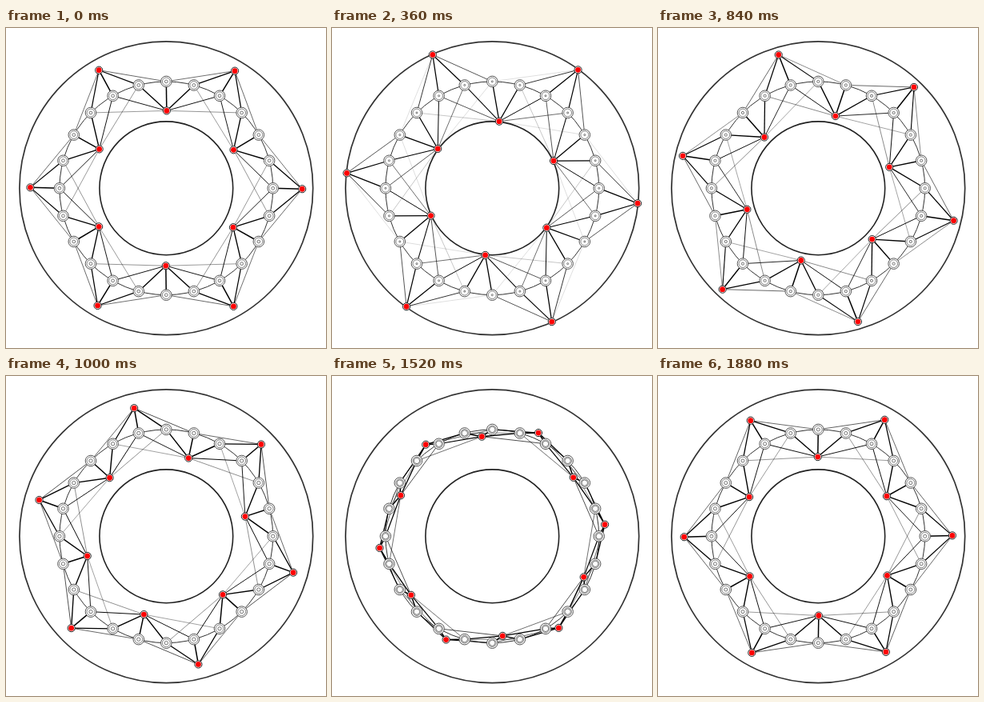
An HTML page with a canvas that plays this animation: 400 px wide and 400 px high, repeating every 1.92 s.

```html
<!DOCTYPE html>
<html lang="en">
<head>
<meta charset="utf-8">
<title>Orbiting web</title>
<style>
html, body { margin: 0; width: 100%; height: 100%; overflow: hidden; background: #fff; }
canvas { display: block; width: 400px; height: 400px; }
</style>
</head>
<body>
<canvas id="stage" width="400" height="400"></canvas>
<script>
const ctx = document.getElementById('stage').getContext('2d');
const LOOP = 1920, STEPS = 48, TAU = Math.PI * 2;
const CENTER = 200.3, RADIUS = 133.4, SWING = 50, REACH = 115;

const polar = (r, a) => ({ x: CENTER + r * Math.cos(a), y: CENTER + r * Math.sin(a) });
const ring = (count, place) => Array.from({ length: count }, (_, k) => place(k));

const nodes = ring(24, k => polar(RADIUS, k * TAU / 24));

function circle(p, r, stroke, width, fill) {
  ctx.beginPath();
  ctx.arc(p.x, p.y, r, 0, TAU);
  if (fill) {
    ctx.fillStyle = fill;
    ctx.fill();
  }
  if (stroke) {
    ctx.strokeStyle = stroke;
    ctx.lineWidth = width;
    ctx.stroke();
  }
}

// Lines get thinner with distance until they vanish.
function link(a, b) {
  const width = (REACH - Math.hypot(a.x - b.x, a.y - b.y)) / 50;
  if (width < 0.12) return;
  ctx.strokeStyle = '#000';
  ctx.lineWidth = Math.min(width, 1.5);
  ctx.beginPath();
  ctx.moveTo(a.x, a.y);
  ctx.lineTo(b.x, b.y);
  ctx.stroke();
}

function draw(u) {
  const wave = Math.cos(Math.PI * (u - 0.25));
  // Alternate movers swing in opposite directions while all turn by one place per loop.
  const movers = ring(12, k =>
    polar(RADIUS + SWING * wave * (k % 2 ? -1 : 1), (k + u) * TAU / 12));
  const core = 4.2 - 3.2 * Math.abs(wave);
  const mid = { x: CENTER, y: CENTER };

  ctx.fillStyle = '#fff';
  ctx.fillRect(0, 0, 400, 400);

  circle(mid, RADIUS + SWING, '#333', 1.7);
  circle(mid, RADIUS - SWING, '#222', 1.6);
  circle(mid, RADIUS, '#333', 1);

  for (const m of movers) for (const n of nodes) link(m, n);

  for (const n of nodes) {
    circle(n, 6.8, '#444', 0.9, '#fff');
    circle(n, 4.9, '#666', 0.8);
    circle(n, core, '#555', 0.8);
  }
  for (const m of movers) {
    circle(m, 4.6, '#222', 1, '#fff');
    circle(m, 3.4, null, 0, '#f00');
  }
}

const start = performance.now();
function tick() {
  const t = (performance.now() - start) % LOOP;
  const step = Math.floor(t * STEPS / LOOP);
  draw((step + 0.5) / STEPS);
  requestAnimationFrame(tick);
}
tick();
</script>
</body>
</html>
```
